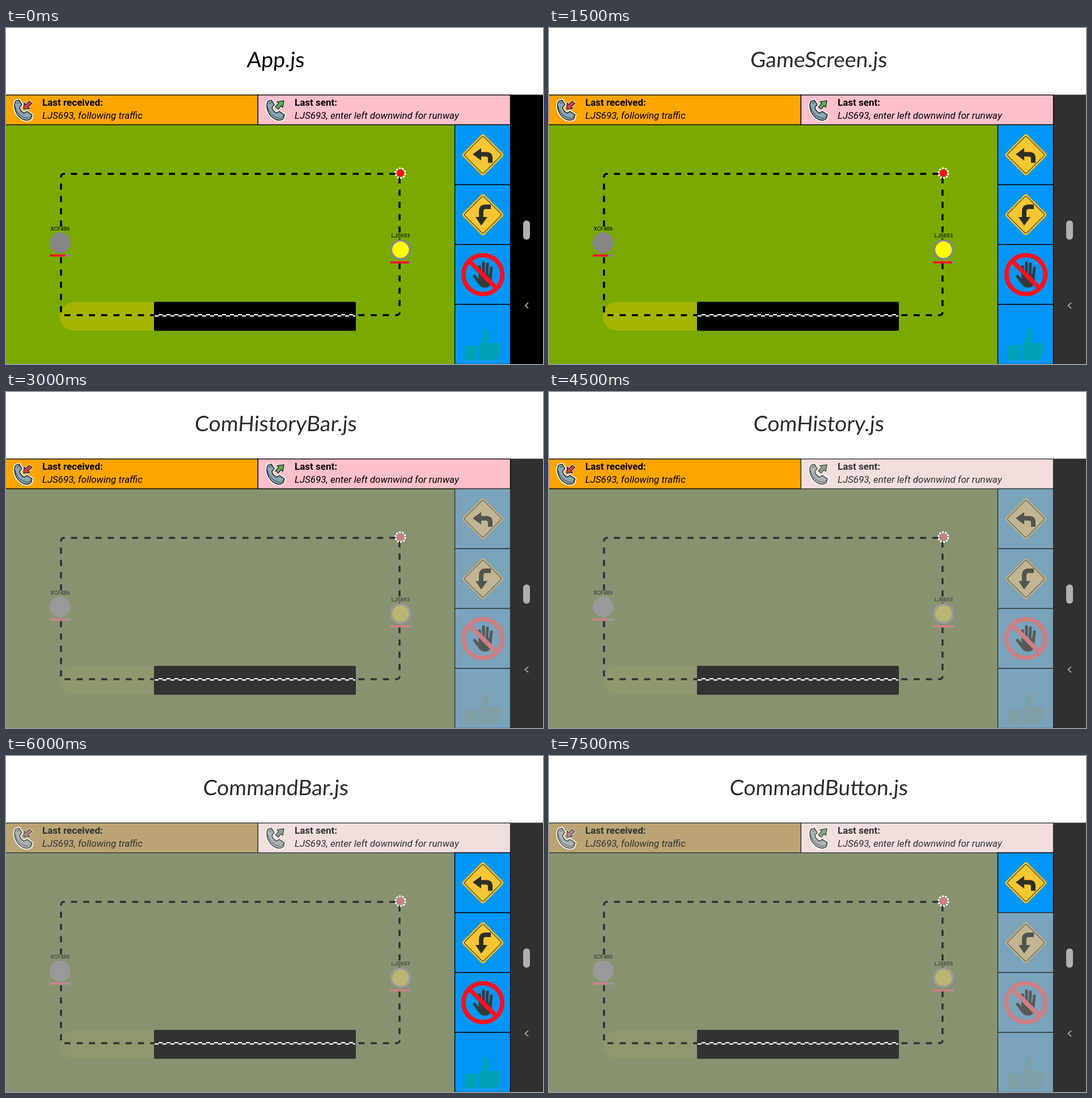
Write an HTML page that moves like this. It is 947 by 592 pixels and loops after 8 s.

```html
<!DOCTYPE html>
<html lang="en">
<head>
<meta charset="utf-8">
<title>Components</title>
<style>
html, body { margin: 0; width: 100%; height: 100%; overflow: hidden; background: #fff; }
svg {
  display: block; width: 100vw; height: 100vh;
  --ink: #000; --grass: #7aaa00; --final: #a4b500; --red: #ff1021; --gray: #868686;
  --plane: #ff0; --orange: #ffa500; --pink: #ffc0cb; --blue: #0096f7; --sign: #f7c733;
  --sign-edge: #dcae2c; --arrow: #2c2f26; --hand: #373b38; --thumb: #00a2b9;
  --phone: #8ba6b6; --in: #d84048; --out: #5fae5a;
}
.dim {
  --ink: #323232; --grass: #879370; --final: #8f976f; --red: #cc8084; --gray: #999;
  --plane: #b8b670; --orange: #bba474; --pink: #f3dede; --blue: #7aa3bc; --sign: #c2b594;
  --sign-edge: #aea27f; --arrow: #51554d; --hand: #565a57; --thumb: #80a0a5;
  --phone: #adb3b5; --in: #b98488; --out: #8ea589;
}
text { font-family: Roboto, sans-serif; fill: var(--ink); }
#title { font: 37.5px Lato, sans-serif; }
.head { font-size: 17px; font-weight: 700; }
.msg { font-size: 17px; font-style: italic; }
.tag { font-size: 9.7px; }
.box { stroke: var(--ink); stroke-width: 1.4; }
</style>
</head>
<body>
<svg id="stage" viewBox="0 0 947 592" preserveAspectRatio="none">
  <defs>
    <path id="handset" d="M17 129l6-2 5 8-4 5c1 5 4 8 8 10l5-3 9 6-2 7c-6 5-15 2-21-4S12 138 17 129z" stroke-linejoin="round"/>
  </defs>
  <rect width="947" height="592" fill="#fff"/>
  <text id="title" text-anchor="middle" transform="translate(475 69) skewX(-4)"></text>
  <rect id="nav" x="889" y="117.5" width="58" height="475"/>
  <rect x="912" y="339" width="12" height="34" rx="6" fill="#b0b0b0"/>
  <path d="M921 484l-5.500 5 5.500 5" fill="none" stroke="#c4c4c4" stroke-width="1.500"/>

  <g id="map">
    <rect x="0" y="170" width="791" height="422" fill="var(--grass)"/>
    <path d="M261 483H120a25 25 0 0 0 0 50H261z" fill="var(--final)"/>
    <path d="M97 501V262a5 5 0 0 1 5-5H689a5 5 0 0 1 5 5V501a5 5 0 0 1-5 5H102a5 5 0 0 1-5-5z"
      fill="none" stroke="var(--ink)" stroke-width="3.600" stroke-dasharray="10.800"/>
    <rect x="261" y="482.500" width="356" height="51" rx="2" fill="var(--ink)"/>
    <g stroke="#fff" stroke-width="2.200" stroke-dasharray="7">
      <path d="M269 505.200H616"/>
      <path d="M262 507.400H616"/>
    </g>
    <circle cx="695.500" cy="255.700" r="6.500" fill="var(--red)"/>
    <circle cx="695.500" cy="255.700" r="8.600" fill="none" stroke="#fff" stroke-width="3" stroke-dasharray="3.200 2.200"/>
  </g>
  <g id="received"></g>
  <g id="sent"></g>
  <g id="turn"></g>
  <g id="base"></g>
  <g id="cancel"></g>
  <g id="confirm"></g>
</svg>
<script>
const $ = id => document.getElementById(id);
const add = (id, markup) => $(id).insertAdjacentHTML("beforeend", markup);

function plane(name, x, y, inner, health) {
  add("map", `
    <circle cx="${x}" cy="${y}" r="18.5" fill="var(--gray)"/>
    <circle cx="${x}" cy="${y}" r="14.6" fill="var(${inner})"/>
    <rect x="${x - 18.5}" y="${y + 20.4}" width="37" height="3.8" fill="var(--gray)"/>
    <rect x="${x - 18.5}" y="${y + 20.4}" width="${health}" height="3.8" fill="var(--red)"/>
    <text class="tag" x="${x}" y="${y - 22}" text-anchor="middle">${name}</text>`);
}

function message(id, x, fill, head, msg, arrow, tint) {
  add(id, `
    <rect class="box" x="${x - 0.7}" y="118" width="445.2" height="52.5" fill="var(${fill})"/>
    <g transform="translate(${x} 0)">
      <g fill="#fff" stroke="#fff" stroke-width="5" stroke-linejoin="round">
        <use href="#handset"/><path d="${arrow}" stroke-width="3"/>
      </g>
      <g stroke="var(--arrow)" stroke-width="1.6" stroke-linejoin="round">
        <use href="#handset" fill="var(--phone)"/>
        <path d="${arrow}" fill="var(${tint})"/>
      </g>
      <path d="M16 138c2 11 12 21 24 21M25 130l-6 3M45 154l-4 5" fill="none" stroke="var(--arrow)"/>
    </g>
    <text class="head" x="${x + 64}" y="137">${head}</text>
    <text class="msg" x="${x + 64}" y="160">${msg}</text>`);
}

// Icons are drawn around the middle of their button.
function button(id, row, icon) {
  const y = 170.5 + row * 105.5;
  add(id, `
    <rect class="box" x="791.5" y="${y}" width="98" height="105.5" fill="var(--blue)"/>
    <g transform="translate(841 ${y + 53})">${icon}</g>`);
}

const sign = arrow => `
  <g transform="rotate(45)">
    <rect x="-26.5" y="-26.5" width="53" height="53" rx="4" fill="var(--sign)" stroke="var(--sign-edge)"/>
    <rect x="-23.7" y="-23.7" width="47.4" height="47.4" rx="3" fill="none" stroke="var(--arrow)" stroke-width="1"/>
  </g>
  <path d="${arrow}" fill="var(--arrow)"/>`;

const stopHand = `
  <g fill="none" stroke="var(--hand)" stroke-width="5" stroke-linecap="round">
    <path d="M-5 4L-6-14M1 2V-21M7 3L8-19M13 5L15-12M-15 3L-5 13"/>
  </g>
  <path d="M-7.500 0H15.500V10Q14 23 4 23Q-4 23-9 15L-14 8L-7 8z" fill="var(--hand)"/>
  <g fill="none" stroke="var(--red)" stroke-width="8">
    <circle r="34.300"/><path d="M-24-24L24 24"/>
  </g>`;

const thumb = `
  <g fill="var(--thumb)">
    <rect x="-32" y="19" width="22" height="27" rx="2"/>
    <path d="M-7 20C-1 14 0 8 1-6Q2-11 6-11C12-9 11 4 9 15H27Q32 16 31 21Q33 25 30 28Q32 33 28 36Q30 41 25 44Q23 46 18 46H4Q-3 46-7 43z"/>
  </g>`;

plane("XCF486", 95.5, 378.5, "--gray", 27.5);
plane("LJS693", 695.8, 390.7, "--plane", 33.5);
message("received", 0, "--orange", "Last received:", "LJS693, following traffic",
  "M31 143l1-11 3 3 6-6 5 4-7 6 3 3z", "--in");
message("sent", 445, "--pink", "Last sent:", "LJS693, enter left downwind for runway",
  "M45 128l-2 12-3-3-5 6-5-4 6-6-3-3z", "--out");
button("turn", 0, sign("M-18-1L-3-12V-5H6Q17-5 17 6V14H9V7Q9 3 5 3H-3V10z"));
button("base", 1, sign("M-3 19L-13 4H-7V-6Q-7-18 5-18H14V-10H5Q1-10 1-6V4H8z"));
button("cancel", 2, stopHand);
button("confirm", 3, thumb);

const STEP = 1500, LOOP = 8000;
const all = ["map", "received", "sent", "turn", "base", "cancel", "confirm"];
const steps = [
  ["App.js", all],
  ["GameScreen.js", all],
  ["ComHistoryBar.js", ["received", "sent"]],
  ["ComHistory.js", ["received"]],
  ["CommandBar.js", ["turn", "base", "cancel", "confirm"]],
  ["CommandButton.js", ["turn"]]
];
let shown = -1;

function draw(ms) {
  const step = Math.floor((ms % LOOP) / STEP);
  if (step === shown) return;
  shown = step;
  const [title, lit] = steps[step];
  $("title").textContent = title;
  $("title").style.fill = step ? "#2b2b2b" : "#000";
  $("nav").setAttribute("fill", step ? "#303030" : "#000");
  for (const id of all) $(id).classList.toggle("dim", !lit.includes(id));
}

const start = performance.now();
function tick() {
  draw(performance.now() - start);
  requestAnimationFrame(tick);
}
tick();
</script>
</body>
</html>
```
